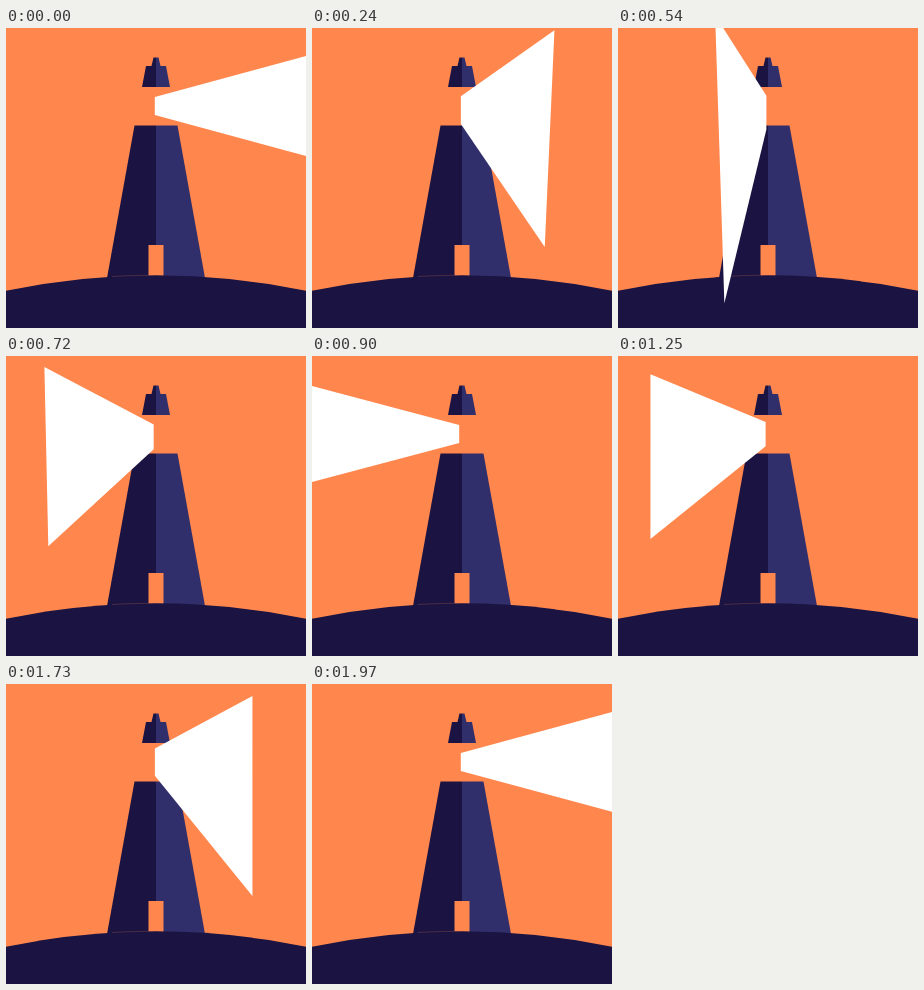
Write an HTML page that moves like this. It is 300x300 px and loops after 2500 ms.

```html
<!DOCTYPE html>
<html lang="en">
<head>
<meta charset="utf-8">
<title>Lighthouse</title>
<style>
  :root { --sky: #ff864c; --dark: #1b1443; --light: #312f6b; }

  html, body {
    margin: 0;
    width: 100%;
    height: 100%;
    overflow: hidden;
    background: var(--sky);
  }

  svg {
    position: absolute;
    left: 0;
    top: 0;
    width: 300px;
    height: 300px;
  }

  .sky { fill: var(--sky); }
  .dark { fill: var(--dark); }
  .light { fill: var(--light); }
  .seam { fill: none; stroke: var(--sky); stroke-width: .6; opacity: .35; }
</style>
</head>
<body>
<svg viewBox="0 0 300 300" aria-hidden="true">
  <!-- Cap -->
  <path class="dark" d="M150 29.5H147.5L145.5 38H140L136 59H150Z"/>
  <path class="light" d="M150 29.5H152.5L154.5 38H160L164 59H150Z"/>
  <!-- Tower -->
  <path class="dark" d="M150 97.5H128.5L101 250H150Z"/>
  <path class="light" d="M150 97.5H171.5L199 250H150Z"/>
  <rect class="sky" x="142.5" y="217" width="15" height="32"/>
  <!-- Hill -->
  <path class="dark" d="M0 262.7Q150 231.7 300 262.7V300H0Z"/>
  <path class="seam" d="M106 248.5Q124 247.4 142 247.3"/>
  <polygon id="beam" fill="#fff"/>
</svg>
<script>
  const LOOP = 2500, SWEEP = 900, BACK = 1070;
  const beam = document.getElementById('beam');

  // Beam pose facing the viewer: heights of the far edge and the lamp,
  // x of the far corners, tilt of the far edge, and the easing away from it.
  const OUTWARD = { far: [-34, 352], lamp: [67, 109], x: [150, 145], tilt: 19, kick: .13, power: 1.23 };
  const RETURN = { far: [-13, 353], lamp: [57, 100], x: [147, 147], tilt: 0, kick: .06, power: 1.47 };

  const mix = (a, b, p) => a + (b - a) * p;

  // side: 1 when the beam points right, -1 when it points left
  function corners(front, side, p) {
    const lampX = mix(148 + .8 * side, 149, p);
    const restX = 150 + 155 * side;
    const topX = mix(restX, front.x[0], p);
    const botX = mix(restX, front.x[1] - front.tilt * side, p);
    return [
      [lampX, mix(69, front.lamp[0], p)],
      [topX, mix(27.6 - side, front.far[0], p)],
      [botX, mix(128.2 + .9 * side, front.far[1], p)],
      [lampX, mix(87, front.lamp[1], p)]
    ];
  }

  function draw(now) {
    const t = now % LOOP;
    const back = t >= BACK;
    const front = back ? RETURN : OUTWARD;
    const turn = Math.min((back ? t - BACK : t) / SWEEP, 1) * 2 - 1;
    const side = (turn < 0) === back ? -1 : 1;
    // Fast past the viewer, slowing towards either side
    const p = (1 - front.kick) * (1 - Math.abs(turn)) ** front.power;
    beam.setAttribute('points', corners(front, side, p).join(' '));
    requestAnimationFrame(draw);
  }

  draw(0);
</script>
</body>
</html>
```
